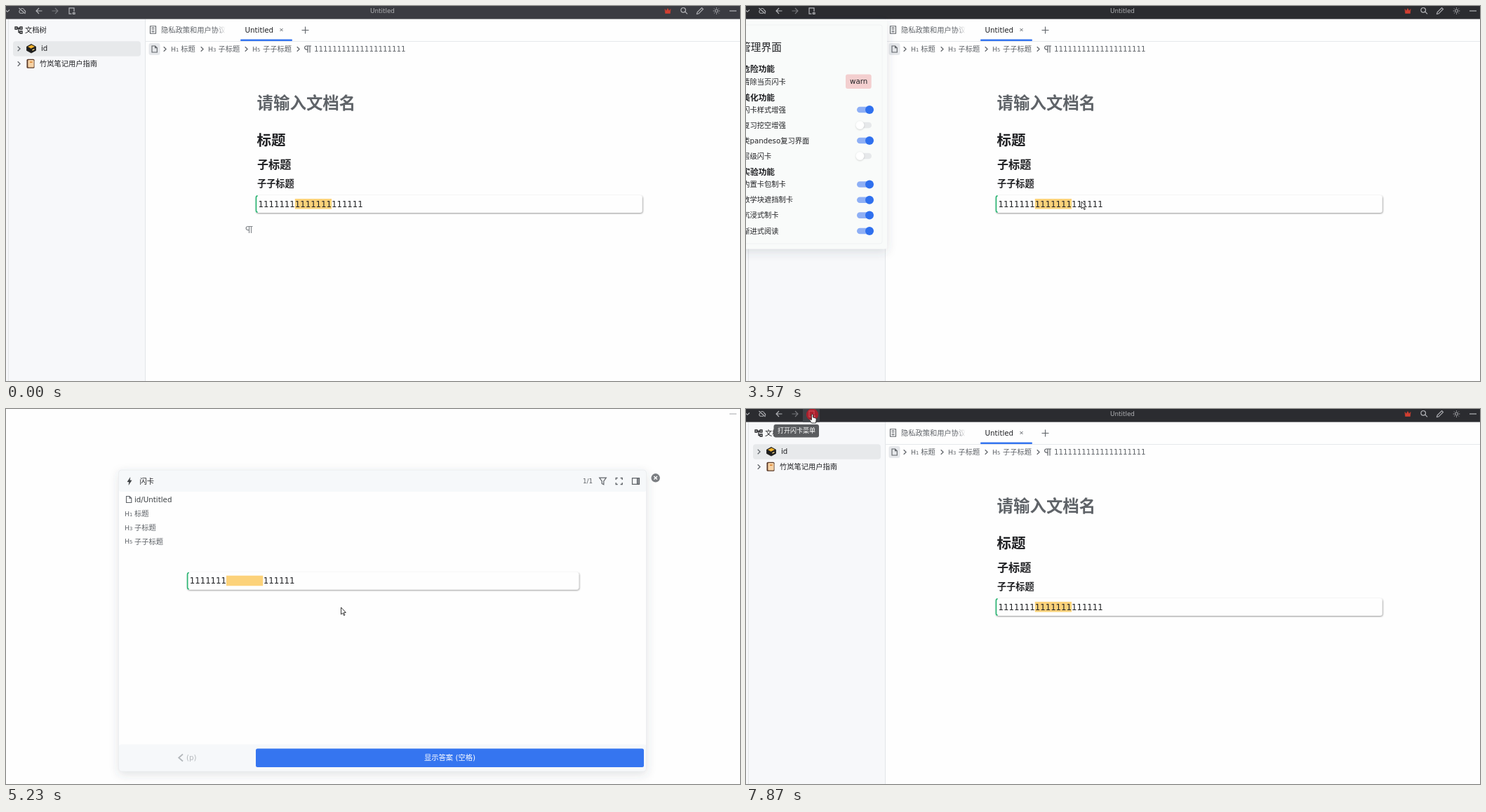
An HTML page that plays this animation: 1046 px wide and 535 px high, repeating every 8000 ms.

```html
<!DOCTYPE html>
<html lang="zh-CN">
<head>
<meta charset="utf-8">
<title>Untitled</title>
<style>
  html, body { margin: 0; width: 100%; height: 100%; overflow: hidden; background: #fefefe; }
  svg { display: block; width: 1046px; height: 535px; }
  text { font-family: "DejaVu Sans", "Noto Sans CJK SC", "Noto Sans CJK", sans-serif; white-space: pre; }
</style>
</head>
<body>
<svg id="stage" viewBox="0 0 1046 535" xmlns="http://www.w3.org/2000/svg"></svg>
<script>
const INK = '#202124', GRAY = '#5f6368', BLUE = '#3575f0', PALE = '#f6f8fa';
const UI = 10.27, BODY = 11.73, SMALL = 8.8;
const LOOP = 8000;

// Text is placed by its left edge and its vertical centre.
const text = (x, cy, size, str, fill = INK, attrs = '') =>
  `<text x="${x}" y="${cy + size * 0.37}" font-size="${size}" fill="${fill}" ${attrs}>${str}</text>`;
const bold = (x, cy, size, str, fill = INK) => text(x, cy, size, str, fill, 'font-weight="700"');
const rect = (x, y, w, h, fill, r = 0, attrs = '') =>
  `<rect x="${x}" y="${y}" width="${w}" height="${h}" rx="${r}" fill="${fill}" ${attrs}/>`;
const circle = (x, y, r, fill, attrs = '') => `<circle cx="${x}" cy="${y}" r="${r}" fill="${fill}" ${attrs}/>`;
const line = (x, y, d, color = GRAY, w = 1.1, fill = 'none') =>
  `<path transform="translate(${x} ${y})" d="${d}" fill="${fill}" stroke="${color}" stroke-width="${w}"/>`;
const group = (id, body, attrs = '') => `<g id="${id}" ${attrs}>${body}</g>`;
const chevron = (x, y) => line(x, y, 'M-1.8-3.3 1.6 0-1.8 3.3', GRAY, 1.2);
const pilcrow = (x, y, color) => line(x, y, 'M10-4.5H3.2a2.6 2.6 0 0 0 0 5.2H5M5-4.5V5M8-4.5V5', color, 1.2);
const heading = (x, y, level, color = GRAY) =>
  text(x, y, 9.4, `H<tspan font-size="6.8">${level}</tspan>`, color);
const page = (x, y) => line(x, y, 'M-3.5-4.5H1L3.8-1.7V4.5H-3.5ZM1-4.5V-1.7H3.8', GRAY);

function titleBar() {
  const c = '#b4b5b9';
  return rect(0, 0, 1046, 18.6, '#2b2c30', 0, 'id="bar"') +
    line(2, 7, 'M-3-1.5 0 1.3 3-1.5', c) +
    line(23, 7, 'M-4.5-4 4.5 4M-1.5-3.2A3.3 3.3 0 0 1 3.2-.6 2 2 0 0 1 4.3 2.6M-3-1A2.4 2.4 0 0 0-2.6 3.3H2', c) +
    line(47, 7, 'M4.5 0H-4M0-4-4 0 0 4', c) +
    line(70, 7, 'M-4.5 0H4M0-4 4 0 0 4', '#77787d') +
    rect(81, 0, 24, 18.6, '#404247', 0, 'id="hot"') +
    line(93.5, 7, 'M3.5 1V-4.2H-3.5V4.2H0M2 2.5H4.5V4.5H2Z', c, 1.2) +
    text(536.5, 7, SMALL, 'Untitled', '#b2b3b6', 'text-anchor="middle"') +
    line(943, 7, 'M-4-2.5-2 0 0-3.5 2 0 4-2.5 3.4 3.5H-3.4Z', '#d23f31', 0.6, '#d23f31') +
    line(966, 7, 'M1.8 1.2 5 4.4M2.5-1.2A3.3 3.3 0 1 1-4.1-1.2 3.3 3.3 0 1 1 2.5-1.2', c, 1.2) +
    line(989, 7, 'M-4.5 4.5-3.8 1.8 2.6-4.5 4.5-2.6-1.8 3.8Z', c) +
    line(1012.5, 7, 'M2 0A2 2 0 1 1-2 0 2 2 0 1 1 2 0M0-4.8V-3.4M0 3.4V4.8M-4.8 0H-3.4M3.4 0H4.8M-3.4-3.4-2.5-2.5M2.5 2.5 3.4 3.4M-3.4 3.4-2.5 2.5M2.5-2.5 3.4-3.4', c, 1);
}

function sidebar() {
  const tools = line(113, 34, 'M-5-2V-4.5H-2M2-4.5H5V-2M5 2V4.5H2M-2 4.5H-5V2M1.2 0A1.2 1.2 0 1 1-1.2 0 1.2 1.2 0 1 1 1.2 0', '#80858a') +
    line(136, 34, 'M5-5 1-1M1-4V-1H4M-5 5-1 1M-4 1H-1V4', '#80858a', 1.2) +
    [-3.2, 0, 3.2].map(d => circle(160, 34 + d, 0.8, '#80858a')).join('') +
    line(183, 34, 'M-5.5 0H5.5', '#80858a');
  return rect(0, 18.6, 198, 517, '#f7f8fa') +
    rect(3, 18.6, 1, 517, '#e3e5e8') + rect(198, 18.6, 1, 517, '#e3e5e8') +
    line(18, 34, 'M-5-4H-2V-1H-5ZM2-4H5V-1H2ZM2 2H5V5H2ZM-2-2.5H2M0-2.5V3.5H2', INK, 1.3) +
    text(27, 34, UI, '文档树') + group('tools', tools) +
    rect(10, 50.3, 182, 21.4, '#e7e9eb', 4) + chevron(18.5, 61) + chevron(18.5, 82.5) +
    line(36, 60.5, 'M-6.5-2.5 0-6 6.5-2.5V3L0 6.5-6.5 3Z', '#1d1d1d', 0.8, '#1d1d1d') +
    line(36, 60.5, 'M-4.5-2.4.5-4.8 4.6-2.6-.4 0Z', '#f5b52e', 0.4, '#f5b52e') +
    line(36, 60.5, 'M1.5 2.6 4.5 1', '#ffe08a', 1.2) +
    text(50, 60.5, UI, 'id') +
    rect(29.5, 75.8, 11, 13, '#5a3a29', 1.5) + rect(31.3, 77, 8.4, 10.6, '#f7d3a6', 1) + rect(34, 79.3, 3.6, 1.6, '#d9822f') +
    text(48, 82.5, UI, '竹岚笔记用户指南');
}

function tabs() {
  const lines = 'M-4-5.2H4V5.2H-4ZM-2-2.6H2M-2 0H2M-2 2.6H2';
  return line(209.5, 34, lines, GRAY) +
    text(221, 34, UI, '隐私政策和用户协议', GRAY, 'clip-path="url(#tabClip)"') +
    rect(300, 26, 13, 16, 'url(#fade)') +
    text(340.5, 34, UI, 'Untitled') + line(392.5, 34, 'M-2-2 2 2M2-2-2 2', GRAY, 1) +
    line(426.5, 34.5, 'M-5 0H5M0-5V5', GRAY, 1.1) +
    rect(198, 50, 848, 1, '#e6e8eb') + rect(334, 47.4, 74, 2.6, BLUE, 1.2);
}

function breadcrumb() {
  const y = 61.5;
  return rect(203.5, 53, 16, 17, '#e6e8eb', 3) + page(211.5, y) +
    [226.5, 279.5, 342.5, 416.5].map(x => chevron(x, y)).join('') +
    heading(235, y, 1) + text(249.3, y, UI, '标题', GRAY) +
    heading(288, y, 3) + text(302.5, y, UI, '子标题', GRAY) +
    heading(351, y, 5) + text(366, y, UI, '子子标题', GRAY) +
    pilcrow(425, y, GRAY) + text(439, y, UI, '1'.repeat(20), GRAY);
}

function block(x, y, w, hidden) {
  const digits = hidden
    ? text(x + 4, y + 12.3, BODY, '1111111') + text(x + 109, y + 12.3, BODY, '111111')
    : text(x + 4, y + 12.3, BODY, '1'.repeat(20));
  return rect(x, y, w, 25, '#fefefe', 3.5, 'filter="url(#lift)"') +
    line(x, y, 'M3 .8Q.8.8.8 3.5V21.5Q.8 24.2 3 24.2', '#2db574', 1.7) +
    rect(x + 56.2, y + 5, 52.2, 14.6, '#fcd27a') + digits;
}

function editor() {
  return bold(357.5, 138.5, 23.47, '请输入文档名', GRAY) +
    bold(357.5, 191, 20.53, '标题') + bold(358, 226, 16.13, '子标题') + bold(358, 253.5, 13.2, '子子标题') +
    block(355.6, 270, 551, false) +
    group('mark', pilcrow(341.5, 319, '#85898d')) +
    group('gutter', heading(327.5, 191.5, 1, '#8a8e92') + '<path d="M344 188H352L348 194.5Z" fill="#6f7377"/>') +
    rect(0, 275, 1, 15, '#111', 0, 'id="caret"');
}

function toggle(y, on) {
  return on
    ? rect(158, y - 4.3, 22, 8.6, '#8eaff5', 4.3) + circle(176, y, 6, '#2f70ee')
    : rect(161, y - 4.3, 18, 8.6, '#e6e8ea', 4.3) + circle(162.5, y, 5.8, '#fff', 'filter="url(#soft)"');
}

function menu() {
  const sections = [['危险功能', 90], ['美化功能', 130.5], ['实验功能', 237]];
  const rows = [
    ['闪卡样式增强', 148, 1], ['复习挖空增强', 170, 0], ['类pandeso复习界面', 192, 1], ['层级闪卡', 214, 0],
    ['内置卡包制卡', 254.5, 1], ['数学块遮挡制卡', 276.7, 1], ['沉浸式制卡', 298.6, 1], ['渐进式阅读', 321, 1]
  ];
  return rect(-20, 19, 221, 327.5, '#f9fbfa', 3, 'filter="url(#shade)"') +
    rect(-20, 27, 214, 312, 'none', 3, 'stroke="#f0f2f3"') +
    text(-7.8, 59, 14.67, '管理界面') +
    sections.map(([s, y]) => bold(-5.8, y, BODY, s)).join('') +
    text(-4.8, 108, UI, '清除当页闪卡') +
    rect(142, 97.5, 36.7, 20.5, '#f3cfcf', 3) + text(148, 107.5, UI, 'warn') +
    rows.map(([s, y, on]) => text(-4.8, y, UI, s) + toggle(y, on)).join('');
}

function dialog() {
  return rect(161, 87, 751.5, 430, '#fefefe', 4, 'filter="url(#shade)"') +
    rect(161, 87, 751.5, 31, PALE, 3) + rect(161, 478.5, 751.5, 38.5, PALE, 3) +
    rect(160.5, 87, 752, 430, 'none', 4, 'stroke="#eceef0"') +
    line(176, 103, 'M1-5.5-3.2 1H-.6L-1.2 5.5 3.2-1.2H.5Z', INK, 0.2, '#3c4043') +
    text(190.5, 103, UI, '闪卡') + text(822, 103, SMALL, '1/1', GRAY) +
    line(850.5, 103, 'M-4.8-4.8H4.8L1.3 0V4.8L-1.3 3.5V0Z', GRAY, 1.2) +
    line(873.7, 103, 'M-4.5-2V-4.5H-2M2-4.5H4.5V-2M4.5 2V4.5H2M-2 4.5H-4.5V2', GRAY, 1.3) +
    line(897.5, 103, 'M-5-4.3H5V4.3H-5ZM2-4.3V4.3M3.5-4.3V4.3', GRAY, 1.2) +
    circle(925.7, 98.3, 6.2, '#7b7e82') + line(925.7, 98.3, 'M-2.3-2.3 2.3 2.3M2.3-2.3-2.3 2.3', '#fff', 1.4) +
    page(175, 129) + text(183, 129, UI, 'id/Untitled', '#3c4043') +
    ['标题', '子标题', '子子标题'].map((s, i) =>
      heading(169, 149.3 + i * 19.8, 1 + i * 2) + text(183, 149.3 + i * 19.8, UI, s, GRAY)).join('') +
    block(257.8, 232.7, 558.5, true) +
    line(249, 497.5, 'M3-5-2.8 0 3 5', '#b4b8bc', 1.8) + text(257, 497, UI, '(p)', '#b4b8bc') +
    rect(356, 484.5, 553, 26.5, BLUE, 2.5, 'id="reveal"') +
    text(632.5, 497.3, UI, '显示答案 (空格)', '#fff', 'text-anchor="middle"');
}

const tooltip = () => rect(39.5, 22, 64.5, 18.6, '#5a5c5f', 3) + text(45, 31, 9, '打开闪卡菜单', '#fff');
const arrow = '<path d="M0 0V10L2.3 8 4 11.6 5.4 11 3.8 7.4H6.8Z" fill="#fff" stroke="#222" stroke-width=".9"/>';
const hand = '<path d="M-1 0Q0-1 1 0V4L5 5Q6 5.5 5.6 8L5 12H-1L-4 7.5Q-4 6-1.2 7.6Z" fill="#fff" stroke="#222" stroke-width=".9"/>';

const shadow = (id, dx, dy, blur, color, alpha) =>
  `<filter id="${id}" x="-20%" y="-40%" width="140%" height="180%">
    <feDropShadow dx="${dx}" dy="${dy}" stdDeviation="${blur}" flood-color="${color}" flood-opacity="${alpha}"/></filter>`;

document.getElementById('stage').innerHTML = `<defs>
  ${shadow('lift', 0.8, 1, 0.9, '#000', 0.42)}${shadow('shade', 0, 4, 7, '#3c4a5c', 0.16)}
  ${shadow('soft', 0, 0.7, 1, '#000', 0.22)}${shadow('hover', 0, 2, 2, '#000', 0.3)}
  <clipPath id="tabClip"><rect x="215" y="20" width="97" height="28"/></clipPath>
  <linearGradient id="fade"><stop stop-color="#fefefe" stop-opacity="0"/><stop offset="1" stop-color="#fefefe"/></linearGradient>
  </defs>` +
  rect(0, 0, 1046, 535, '#fefefe') + sidebar() + tabs() + breadcrumb() + editor() + titleBar() +
  group('menu', menu()) + rect(0, 0, 1046, 535, '#fefefe', 0, 'id="scrim"') + group('dialog', dialog()) +
  line(1036, 7, 'M-5 0H5', '#b4b5b9', 1.2) + group('tip', tooltip()) +
  circle(0, 0, 8.6, '#e01020', 'id="press" opacity=".65"') +
  group('cursor', group('arrow', arrow) + group('hand', hand));

const el = id => document.getElementById(id);
const set = (id, name, value) => el(id).setAttribute(name, value);
const show = (id, on) => set(id, 'visibility', on ? 'visible' : 'hidden');
const ramp = (t, a, b) => Math.min(1, Math.max(0, (t - a) / (b - a)));
const smooth = p => p * p * (3 - 2 * p);
const within = (t, ...spans) => spans.some(([a, b]) => t >= a && t < b);

// Pointer stops: time, x, y
const path = [
  [70, 990, 515], [530, 520, 288], [730, 520, 288], [1470, 82, 8], [1750, 94, 8], [2010, 94, 8],
  [2490, 42, 143], [2700, 37, 165], [2950, 37, 165], [3560, 478, 279], [4570, 478, 279], [4760, 477.5, 283],
  [5230, 477.5, 283], [5480, 440, 495], [5780, 360, 246], [6030, 219, 300], [6300, 132.5, 313.5],
  [6840, 132.5, 313.5], [7650, 92, 8], [7790, 94.5, 8]
];

function pointer(t) {
  const i = path.findIndex(k => k[0] > t);
  if (i < 0) return path[path.length - 1].slice(1);
  if (i === 0) return path[0].slice(1);
  const [a, x0, y0] = path[i - 1], [b, x1, y1] = path[i];
  const p = smooth(ramp(t, a, b));
  return [x0 + (x1 - x0) * p, y0 + (y1 - y0) * p];
}

function draw(t) {
  const [x, y] = pointer(t);
  set('bar', 'fill', t < 730 ? '#3b3c42' : '#2b2c30');
  show('mark', t < 200);
  show('gutter', within(t, [1010, 3250]));
  show('cursor', t >= 70);
  set('cursor', 'transform', `translate(${x} ${y})`);
  const pointing = within(t, [1420, 2080], [7600, LOOP]);
  show('hand', t >= 70 && pointing);
  show('arrow', t >= 70 && !pointing);

  set('press', 'transform', `translate(${x} ${y})`);
  show('press', within(t, [730, 800], [1940, 2010], [3600, 3720], [6300, 6370], [7850, LOOP]));

  set('caret', 'x', t < 3000 ? 509 : 479);
  show('caret', within(t, [730, 1260], [1790, 2320], [3600, 4090], [4500, 4760]));

  set('tools', 'opacity', ramp(t, 1200, 1300) * (1 - ramp(t, 1390, 1500)) +
    ramp(t, 6480, 6650) * (1 - ramp(t, 7500, 7640)));
  show('hot', within(t, [1540, 2080], [7700, LOOP]));
  show('tip', within(t, [1680, 2010], [7780, LOOP]));
  show('menu', within(t, [2010, 3760]));

  const open = smooth(ramp(t, 4560, 4760)) * (1 - smooth(ramp(t, 6310, 6480)));
  const scale = 0.9 + 0.1 * open;
  set('scrim', 'opacity', open);
  set('dialog', 'opacity', open);
  set('dialog', 'transform', `translate(537 302) scale(${scale}) translate(-537 -302)`);
  const hovering = open === 1 && x > 356 && x < 909 && y > 484 && y < 511;
  set('reveal', 'filter', hovering ? 'url(#hover)' : 'none');
}

let start;
function tick(now) {
  start ??= now;
  draw((now - start) % LOOP);
  requestAnimationFrame(tick);
}
draw(0);
requestAnimationFrame(tick);
</script>
</body>
</html>
```
